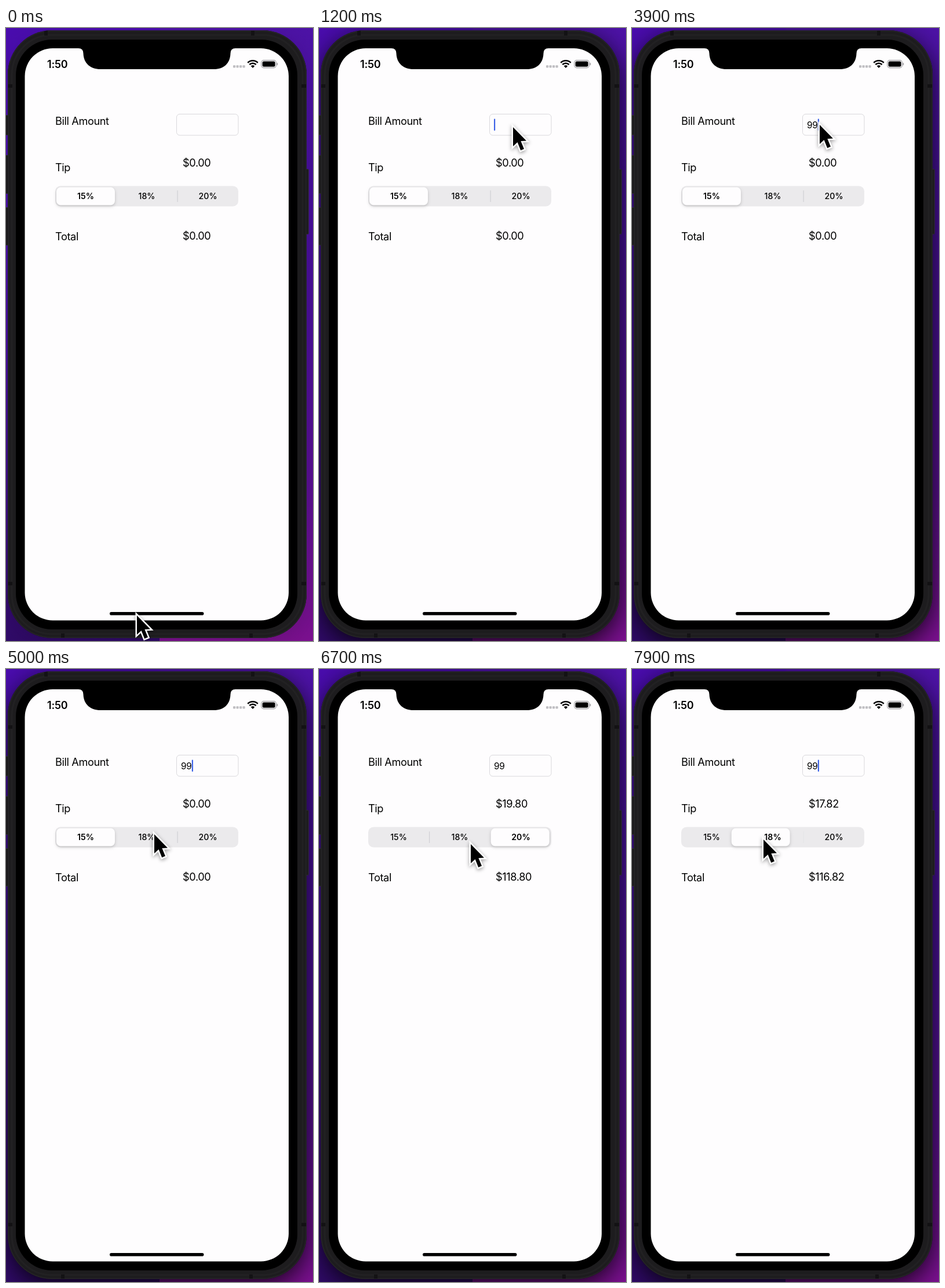
An HTML page with a canvas for the animation above (8 s loop, 530 by 1057 pixels).

```html
<!DOCTYPE html>
<html lang="en">
<head>
<meta charset="utf-8">
<title>Tip calculator</title>
<style>
  html, body { margin: 0; width: 100%; height: 100%; overflow: hidden; background: #2a0860; }
  canvas { display: block; width: 530px; height: 1057px; }
</style>
</head>
<body>
<canvas id="stage" width="530" height="1057"></canvas>
<script>
const W = 530, H = 1057, LOOP = 8000, STEP = 100;
const ctx = document.getElementById('stage').getContext('2d');

const BILL = 99;
const RATES = [15, 18, 20];
const SEG_X = 87, SEG_STEP = 105.75, SEG_W = 101;

// Segment picks: start time and index
const PICKS = [[5230, 1], [6400, 2], [7070, 0], [7750, 1]];

// Pointer tip: time, x, y
const POINTER = [
  [0, 226, 1013], [100, 360, 560], [200, 495, 19], [300, 560, 60], [400, 560, 60],
  [500, 470, 105], [600, 372, 155], [700, 335, 171], [1200, 335, 171],
  [1300, 327, 168], [1400, 324, 167], [4600, 324, 167], [4700, 317, 182],
  [4800, 284, 240], [4900, 260, 278], [5000, 256, 285], [5600, 256, 285],
  [5800, 303, 301], [6000, 344, 309], [6100, 339, 305], [6200, 340, 299],
  [6500, 340, 299], [6700, 262, 302], [6900, 154, 300], [7000, 142, 299],
  [7400, 142, 299], [7700, 227, 294], [8000, 227, 294]
];

const clamp = v => Math.max(0, Math.min(1, v));
const ramp = (t, a, b) => clamp((t - a) / (b - a));
const mix = (a, b, k) => a + (b - a) * k;

function spring(ms) {
  const x = Math.max(0, ms) * 0.02;
  return 1 - (1 + x) * Math.exp(-x);
}

function pointerAt(t) {
  const i = Math.max(1, POINTER.findIndex(p => p[0] >= t));
  const a = POINTER[i - 1], b = POINTER[i];
  const k = ramp(t, a[0], b[0]);
  return [mix(a[1], b[1], k), mix(a[2], b[2], k)];
}

function selection(t) {
  let from = 0, to = 0, k = 1, picked = false;
  for (const [start, index] of PICKS) {
    if (t < start) break;
    from = to;
    to = index;
    k = spring(t - start);
    picked = true;
  }
  return { from, to, k, picked };
}

function caretAlpha(t) {
  if (t < 1200) return 0;
  if (t >= 3800 && t < 4300) return 1;
  const p = (t + (t < 3800 ? 0 : 300)) % 1000;
  return p < 500 ? ramp(p, 80, 180) : 1 - ramp(p, 680, 780);
}

function fillBox(x, y, w, h, r, color) {
  ctx.beginPath();
  ctx.roundRect(x, y, w, h, r);
  ctx.fillStyle = color;
  ctx.fill();
}

function strokeBox(x, y, w, h, r, color, width = 1) {
  ctx.beginPath();
  ctx.roundRect(x, y, w, h, r);
  ctx.strokeStyle = color;
  ctx.lineWidth = width;
  ctx.stroke();
}

function shadow(color, blur, dy) {
  ctx.shadowColor = color;
  ctx.shadowBlur = blur;
  ctx.shadowOffsetY = dy;
}

function text(str, x, y, size, weight = 400, spacing = 0, align = 'left') {
  ctx.font = `${weight} ${size}px Inter, Roboto, sans-serif`;
  ctx.letterSpacing = spacing + 'px';
  ctx.textAlign = align;
  ctx.fillStyle = '#000';
  ctx.fillText(str, x, y);
}

const label = (str, x, y) => text(str, x, y, 18.2, 400, -0.4);
const money = v => '$' + v.toFixed(2);

function gradient(x0, y0, x1, y1, stops) {
  const g = ctx.createLinearGradient(x0, y0, x1, y1);
  stops.forEach((c, i) => g.addColorStop(i / (stops.length - 1), c));
  return g;
}

function drawBackdrop() {
  ctx.fillStyle = gradient(0, 0, 0, H, ['#4a0cae', '#4a0fae', '#480da4', '#3e0b88', '#300a68']);
  ctx.fillRect(0, 0, W / 2, H);
  ctx.fillStyle = gradient(0, 0, 0, H, ['#4d12a6', '#470f9c', '#4b0f98', '#5a0f92', '#7c1090']);
  ctx.fillRect(W / 2, 0, W / 2, H);
}

function drawBody(focus) {
  ctx.save();
  shadow(`rgba(0,0,0,${mix(0.15, 0.8, focus)})`, 44, 12);
  fillBox(3, 4, 516, 1048, 76, '#1d1c1e');
  ctx.restore();

  for (const [y, h] of [[150, 35], [219, 67], [309, 66]]) {
    fillBox(-3, y, 7, h, 2, '#1b1a1c');
    strokeBox(-3, y + 0.5, 7, h - 1, 2, '#302e33');
  }
  fillBox(517, 243, 5.5, 113, 2, '#1b1a1c');
  strokeBox(517, 243.5, 5, 112, 2, '#302e33');

  fillBox(3, 4, 516, 1048, 76, '#1d1c1e');
  strokeBox(4, 5, 514, 1046, 75, '#2b2a2d');
  strokeBox(10, 12, 502, 1033, 69, '#222123', 3);

  ctx.fillStyle = '#131214';
  for (const y of [97, 955]) {
    ctx.fillRect(4, y, 7, 6);
    ctx.fillRect(510, y, 8, 6);
  }
  for (const x of [66, 423]) ctx.fillRect(x, 5, 6, 8);
  for (const x of [95, 420]) ctx.fillRect(x, 1044, 6, 7);

  fillBox(17, 20, 486, 1017, 62, '#000');
  fillBox(32.5, 35, 455.5, 986.5, 48, '#fefdfe');
}

function drawNotch() {
  ctx.beginPath();
  ctx.moveTo(125, 34);
  ctx.lineTo(125, 35);
  ctx.quadraticCurveTo(133.5, 35, 133.5, 44);
  ctx.bezierCurveTo(134, 61, 146, 71, 163, 71);
  ctx.lineTo(359, 71);
  ctx.bezierCurveTo(376, 71, 387, 61, 387.5, 44);
  ctx.quadraticCurveTo(387.5, 35, 396, 35);
  ctx.lineTo(396, 34);
  ctx.fillStyle = '#000';
  ctx.fill();
}

function drawStatus() {
  text('1:50', 71, 68.5, 18, 600, -0.2);
  for (let i = 0; i < 4; i++) fillBox(392 + i * 5.5, 64.2, 4.2, 4.2, 1, '#bfbec2');

  // Wi-Fi fan
  ctx.save();
  ctx.beginPath();
  ctx.moveTo(426, 69);
  ctx.lineTo(414, 56.5);
  ctx.lineTo(414, 50);
  ctx.lineTo(438, 50);
  ctx.lineTo(438, 56.5);
  ctx.closePath();
  ctx.clip();
  ctx.strokeStyle = ctx.fillStyle = '#000';
  ctx.lineWidth = 2.6;
  for (const r of [12.3, 7.8]) {
    ctx.beginPath();
    ctx.arc(426, 68.5, r, 0, 7);
    ctx.stroke();
  }
  ctx.beginPath();
  ctx.arc(426, 68.5, 4.3, 0, 7);
  ctx.fill();
  ctx.restore();

  strokeBox(440.8, 55.6, 25.6, 13, 4, '#9a999d', 1.1);
  fillBox(442.6, 57.4, 22, 9.4, 2.4, '#000');
  fillBox(467.6, 60, 1.6, 4.4, 0.8, '#9a999d');
}

function drawForm(t) {
  const { from, to, k, picked } = selection(t);
  const tip = picked ? BILL * RATES[to] / 100 : 0;

  label('Bill Amount', 85, 166.5);
  label('Tip', 85, 247);
  label('Total', 85, 366);
  label(money(tip), 305, 238.5);
  label(money(picked ? BILL + tip : 0), 305, 365);

  strokeBox(294.5, 148.5, 106.5, 36.5, 5.5, '#d9d8dc');
  const typed = String(BILL).slice(0, t < 3800 ? 0 : t < 3900 ? 1 : 2);
  text(typed, 302, 172.5, 15.4, 400, -0.2);
  const caretX = 302 + typed.length * 9.4;
  ctx.globalAlpha = caretAlpha(t);
  fillBox(caretX, 156.5, 2.2, 20.5, 1, '#3c62e6');
  ctx.globalAlpha = 1;

  drawSegments(from, to, k);
}

function drawSegments(from, to, k) {
  fillBox(85, 272.5, 316, 35, 9, '#ebeaec');

  // A divider hides beside the selected segment
  [0, 1].forEach(i => {
    const shown = s => s === i || s === i + 1 ? 0 : 1;
    ctx.globalAlpha = mix(shown(from), shown(to), k);
    fillBox(190 + i * 105.5, 280, 1.2, 20, 0.5, '#cfced3');
  });
  ctx.globalAlpha = 1;

  const x = SEG_X + mix(from, to, k) * SEG_STEP;
  ctx.save();
  shadow('rgba(0,0,0,0.2)', 5, 2);
  fillBox(x, 274.5, SEG_W, 31, 7.5, '#fefdfe');
  ctx.restore();

  RATES.forEach((rate, i) => {
    text(rate + '%', 137.5 + i * 105.5, 295.2, 14.2, i === to ? 600 : 500, 0, 'center');
  });
}

function drawPointer(x, y) {
  ctx.save();
  ctx.translate(x, y);
  ctx.beginPath();
  ctx.moveTo(0, 0);
  [[0, 33], [7.6, 26], [13.2, 40], [19, 37.6], [13.4, 24], [23, 23.6]]
    .forEach(p => ctx.lineTo(...p));
  ctx.closePath();
  ctx.lineJoin = 'miter';
  ctx.lineWidth = 5;
  ctx.strokeStyle = '#fff';
  shadow('rgba(0,0,0,0.4)', 6, 2);
  ctx.stroke();
  shadow('transparent', 0, 0);
  ctx.fillStyle = '#000';
  ctx.fill();
  ctx.restore();
}

function draw(t) {
  drawBackdrop();
  drawBody(ramp(t, 600, 900));
  drawNotch();
  drawStatus();
  drawForm(t);
  fillBox(179, 1007, 162.5, 5.6, 2.8, '#000');
  drawPointer(...pointerAt(t));
}

const begin = performance.now();
function tick() {
  const t = (performance.now() - begin) % LOOP;
  draw(Math.floor(t / STEP) * STEP);
  requestAnimationFrame(tick);
}
tick();
</script>
</body>
</html>
```
